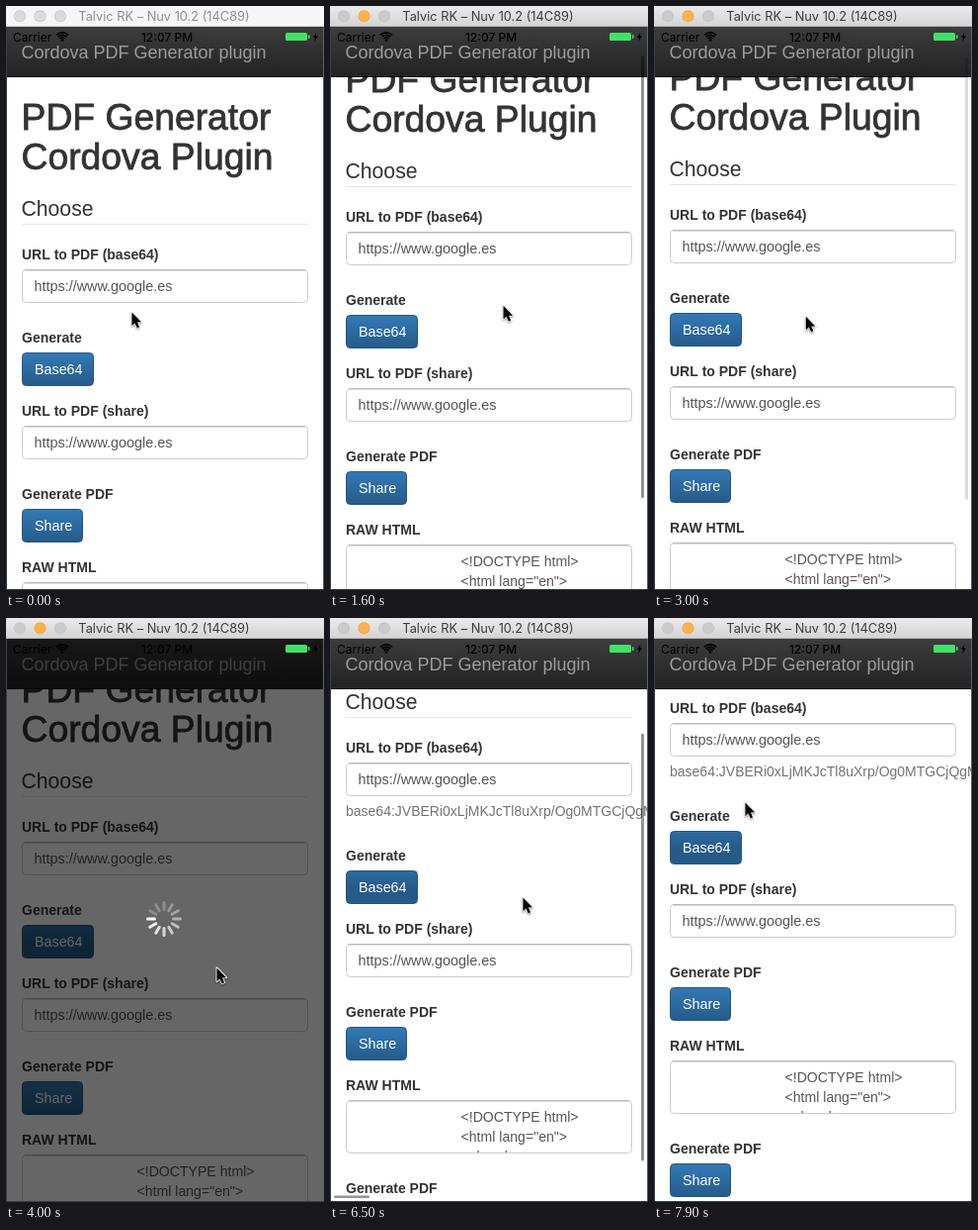
These frames come from a looping animation (322 by 590 pixels, 8000 ms). An HTML page with a canvas:

```html
<!DOCTYPE html>
<html lang="en">
<head>
<meta charset="utf-8">
<title>PDF Generator demo</title>
<style>
html, body { margin: 0; width: 100%; height: 100%; overflow: hidden; background: #fff; }
canvas { display: block; }
</style>
</head>
<body>
<canvas id="stage" width="322" height="590"></canvas>
<script>
const W = 322, H = 590, LOOP = 8000, STEP = 100;
const BAR_H = 21, NAV_BOTTOM = 72, MARGIN = 16, CONTROL_H = 34;
const RESULT_AT = 4700;
const SANS = '"Liberation Sans", Arial, sans-serif';
const UI = 'Inter, Roboto, sans-serif';
const ctx = document.getElementById('stage').getContext('2d');

// Progress from 0 to 1 between two times.
const ramp = (t, from, to) => Math.min(1, Math.max(0, (t - from) / (to - from)));
const pulse = (t, from, to, fadeIn, fadeOut) =>
  ramp(t, from, from + fadeIn) - ramp(t, to, to + fadeOut);

function scrollAt(t) {
  return 46 * ramp(t, 300, 1400) - 38 * ramp(t, 1400, 2300)
    + 32 * ramp(t, 2300, 2800) + 120 * ramp(t, 6000, 6750);
}

// The pointer drags the page, so its places are held in page coordinates.
function pointerAt(t) {
  let x = 127, y = 309;
  const glide = (from, to, toX, toY) => {
    const k = ramp(t, from, to);
    x += (toX - x) * k;
    y += (toY - y) * k;
  };
  glide(0, 300, 176, 337);
  glide(1400, 2300, 172, 350);
  glide(2900, 3500, 60, 369);
  glide(3700, 4000, 213, 393);
  glide(5500, 5800, 195, 402);
  glide(7300, 7900, 92, 346);
  return [x, y - scrollAt(t)];
}

function text(str, x, y, size, color, { weight = 400, family = SANS, align = 'left' } = {}) {
  ctx.font = `${weight} ${size}px ${family}`;
  ctx.fillStyle = color;
  ctx.textAlign = align;
  ctx.fillText(str, x, y);
}

function heading(str, y) {
  text(str, MARGIN - 0.5, y, 37.3, '#333');
  ctx.lineWidth = 0.8;
  ctx.strokeStyle = '#333';
  ctx.strokeText(str, MARGIN - 0.5, y);
}

function rect(x, y, w, h, color) {
  ctx.fillStyle = color;
  ctx.fillRect(x, y, w, h);
}

function roundBox(x, y, w, h, r, fill, stroke) {
  ctx.beginPath();
  ctx.roundRect(x, y, w, h, r);
  if (fill) { ctx.fillStyle = fill; ctx.fill(); }
  if (stroke) { ctx.lineWidth = 1; ctx.strokeStyle = stroke; ctx.stroke(); }
}

function disc(x, y, r, fill) {
  ctx.beginPath();
  ctx.arc(x, y, r, 0, Math.PI * 2);
  ctx.fillStyle = fill;
  ctx.fill();
}

function clipped(x, y, w, h, paint) {
  ctx.save();
  ctx.beginPath();
  ctx.rect(x, y, w, h);
  ctx.clip();
  paint();
  ctx.restore();
}

function vertical(y0, y1, from, to) {
  const g = ctx.createLinearGradient(0, y0, 0, y1);
  g.addColorStop(0, from);
  g.addColorStop(1, to);
  return g;
}

function field(y, h) {
  roundBox(MARGIN + 0.5, y + 0.5, 289, h - 1, 4, '#fff', '#ccc');
  rect(MARGIN + 3, y, 284, 1, '#bbb');
  rect(MARGIN + 2, y + 1, 286, 1, '#dcdcdc');
}

function button(label, y, w, focused) {
  const lift = focused ? 15 : 0;
  const fill = vertical(y - lift, y + CONTROL_H - lift, '#337ab7', '#265a88');
  roundBox(MARGIN + 0.5, y + 0.5, w - 1, CONTROL_H - 1, 4, fill, '#245580');
  text(label, 29, y + 22, 14.3, '#fff');
}

// Each form group is a bold label, a control and a gap below.
function form(top, hasResult, focused) {
  let y = top;
  const group = (label, height, gap, paint) => {
    text(label, MARGIN, y, 14, '#333', { weight: 700 });
    paint(y + 10);
    y += height + gap;
  };
  const urlGroup = label => group(label, CONTROL_H, 50, at => {
    field(at, CONTROL_H);
    text('https://www.google.es', 28.5, at + 22, 14.4, '#555');
  });
  const buttonGroup = (label, caption, w, pressed) =>
    group(label, CONTROL_H, 40, at => button(caption, at, w, pressed));

  urlGroup('URL to PDF (base64)');
  if (hasResult) {
    text('base64:JVBERi0xLjMKJcTl8uXrp/Og0MTGCjQgMCBvYmoKPDwg', MARGIN, y - 20, 14, '#737373');
    y += 25;
  }
  buttonGroup('Generate', 'Base64', 73, focused);
  urlGroup('URL to PDF (share)');
  buttonGroup('Generate PDF', 'Share', 62);
  group('RAW HTML', 54, 50, at => {
    field(at, 54);
    clipped(MARGIN + 1, at + 1, 288, 52, () =>
      ['<!DOCTYPE html>', '<html lang="en">', '  <head>'].forEach((line, i) =>
        text(line, 132.5, at + 22 + i * 20, 14.1, '#555')));
  });
  buttonGroup('Generate PDF', 'Share', 62);
}

function page(scroll, hasResult, focused) {
  clipped(0, NAV_BOTTOM, W, H - NAV_BOTTOM, () => {
    ctx.translate(0, -Math.round(scroll));
    heading('PDF Generator', 125);
    heading('Cordova Plugin', 164.5);
    text('Choose', MARGIN - 0.5, 212, 21.2, '#333');
    rect(MARGIN, 220, 290, 1, '#e5e5e5');
    form(256, hasResult, focused);
  });
}

function navbar() {
  rect(0, BAR_H, W, NAV_BOTTOM - BAR_H, vertical(BAR_H, NAV_BOTTOM, '#3c3c3c', '#222'));
  rect(0, NAV_BOTTOM - 1, W, 1, '#080808');
  text('Cordova PDF Generator plugin', 15.5, 53, 18, '#9d9d9d');
}

function scrollbars(scroll, alpha, hasResult) {
  ctx.globalAlpha = alpha;
  const color = 'rgba(0,0,0,.42)';
  const length = hasResult ? 432 : 447;
  roundBox(315, 474 + 0.62 * scroll - length, 3, length, 1.5, color);
  if (hasResult) roundBox(4, 583.5, 36, 2.5, 1.2, color);
  ctx.globalAlpha = 1;
}

function spinner(t) {
  const head = Math.floor((t - 4000) / 1000 * 12) + 6;
  for (let i = 0; i < 12; i++) {
    ctx.save();
    ctx.translate(160, 304);
    ctx.rotate((head - i) * Math.PI / 6);
    roundBox(8, -1.5, 10, 3, 1.5, `rgba(255,255,255,${Math.max(0.25, 1 - i * 0.085)})`);
    ctx.restore();
  }
}

function overlay(t, alpha) {
  if (!alpha) return;
  ctx.globalAlpha = alpha;
  rect(0, BAR_H, W, H - BAR_H, 'rgba(0,0,0,.6)');
  spinner(t);
  ctx.globalAlpha = 1;
}

function statusBar() {
  text('Carrier', 7, 35.5, 12, '#000', { family: UI });
  text('12:07 PM', 163, 35.5, 12, '#000', { weight: 500, family: UI, align: 'center' });
  ctx.strokeStyle = '#000';
  ctx.lineWidth = 1.7;
  for (let r = 3.6; r < 9; r += 2.5) {
    ctx.beginPath();
    ctx.arc(57, 35.5, r, -Math.PI * 0.75, -Math.PI * 0.25);
    ctx.stroke();
  }
  disc(57, 34.6, 1.4, '#000');
  roundBox(283, 27, 22, 8, 1.5, '#43e065');
  roundBox(306, 29, 1.5, 4, 0.7, '#43e065');
  ctx.fillStyle = '#000';
  ctx.fill(new Path2D('M314.5 26.5l-3.5 5.3h2.2l-1.2 4.2 4-5.6h-2.2z'));
}

function titleBar(active) {
  rect(0, 0, W, BAR_H, active ? vertical(0, BAR_H, '#ebebeb', '#d3d3d3') : '#f6f6f6');
  rect(0, BAR_H - 1, W, 1, active ? '#b4b4b4' : '#d5d5d5');
  for (let i = 0; i < 3; i++) {
    const lit = active && i === 1;
    const x = 14 + i * 20.5;
    disc(x, 10.3, 6, lit ? '#e9a348' : '#c0c0c0');
    disc(x, 10.3, 5.4, lit ? '#fdb24a' : active ? '#cbcbcb' : '#dcdcdc');
  }
  text('Talvic RK – Nuv 10.2 (14C89)', 160, 15, 12.8, active ? '#3c3c3c' : '#8f8f8f',
    { family: UI, align: 'center' });
}

function pointer([x, y]) {
  const arrow = new Path2D('M.5 .5V14l3-2.8 2.3 5 2.2-1-2.2-4.9H10z');
  ctx.save();
  ctx.translate(x, y);
  ctx.shadowColor = 'rgba(0,0,0,.3)';
  ctx.shadowBlur = 2;
  ctx.shadowOffsetY = 1;
  ctx.lineWidth = 2;
  ctx.lineJoin = 'round';
  ctx.strokeStyle = '#fff';
  ctx.stroke(arrow);
  ctx.fillStyle = '#000';
  ctx.fill(arrow);
  ctx.restore();
}

function draw(t) {
  const scroll = scrollAt(t);
  const hasResult = t >= RESULT_AT;
  rect(0, 0, W, H, '#fff');
  page(scroll, hasResult, t >= 3400);
  navbar();
  scrollbars(scroll, pulse(t, 300, 2800, 100, 300) + pulse(t, 5900, 6900, 100, 300), hasResult);
  overlay(t, pulse(t, 3700, RESULT_AT, 300, 400));
  statusBar();
  titleBar(t >= 300);
  rect(0, BAR_H, 1, H - BAR_H, '#34424f');
  rect(W - 1, BAR_H, 1, H - BAR_H, '#5a646e');
  rect(0, H - 1, W, 1, '#34424f');
  pointer(pointerAt(t));
}

const start = performance.now();
function tick() {
  const t = (performance.now() - start) % LOOP;
  draw(Math.floor(t / STEP) * STEP);
  requestAnimationFrame(tick);
}
tick();
</script>
</body>
</html>
```
